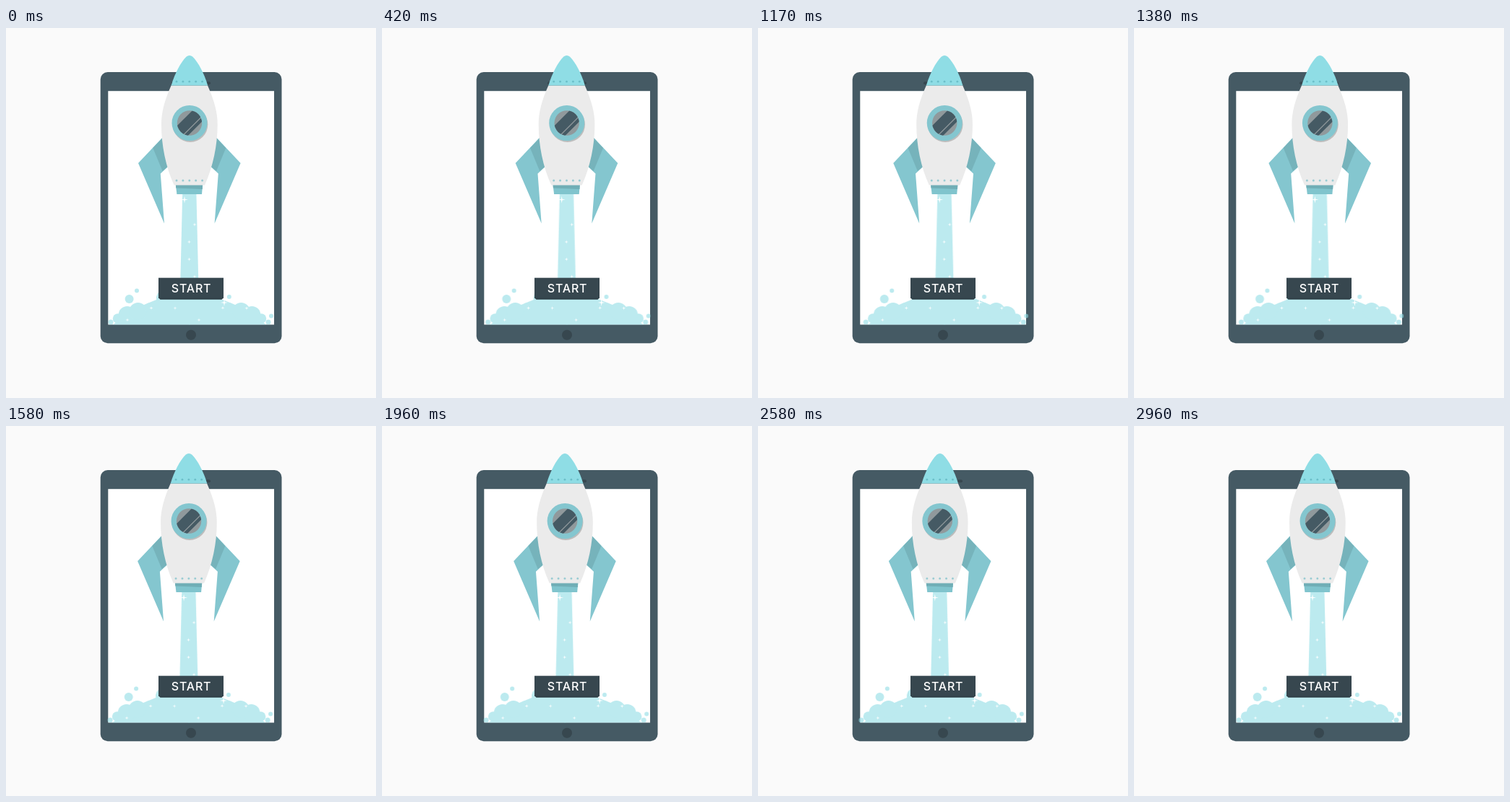
An HTML page that plays this animation: 512x512 px, repeating every 3 s.

```html
<!DOCTYPE html>
<html lang="en">
<head>
<meta charset="utf-8">
<title>Rocket launch</title>
<style>
  html, body { margin: 0; width: 100%; height: 100%; overflow: hidden; background: #fafafa; }
  svg { display: block; width: 100vw; height: 100vh; }
  .label { font: 500 16px Inter, "Open Sans", sans-serif; letter-spacing: .8px; fill: #fff; }
</style>
</head>
<body>
<svg viewBox="0 0 512 512">
  <defs>
    <clipPath id="glass"><circle cx="254" cy="131.5" r="17.2"/></clipPath>
    <clipPath id="floor"><rect width="512" height="410.5"/></clipPath>
  </defs>

  <!-- tablet -->
  <rect x="130.7" y="61" width="250.8" height="375.3" rx="10" fill="#455a64"/>
  <rect x="141.3" y="87.2" width="229.7" height="323.3" fill="#fff"/>
  <rect x="229" y="74.2" width="54" height="4" rx="2" fill="#37474f"/>
  <circle cx="256" cy="424.7" r="7" fill="#37474f"/>

  <g id="ship">
    <!-- exhaust -->
    <g fill="#8fdde5" opacity=".6">
      <path d="M244.2 229H263.4L266.3 350H241.3Z"/>
      <g clip-path="url(#floor)">
        <g id="puffs"><path d="M146 412L168 396L186 385L213 374H255V412Z"/></g>
        <use href="#puffs" transform="translate(508 0) scale(-1 1)"/>
        <circle cx="220" cy="374" r="12"/>
      </g>
      <circle cx="170.6" cy="375" r="6"/>
      <circle cx="181" cy="363.4" r="3"/>
      <circle cx="308.8" cy="372" r="3"/>
      <circle cx="367" cy="398.5" r="3"/>
    </g>
    <g id="sparks" fill="#fff"></g>

    <!-- fins -->
    <g id="fin">
      <path d="M217 151L183 187L219 270.5L213.8 201.5L224 192Z" fill="#84c6cf"/>
      <path d="M217.6 151L203.3 166L216.6 198L226 190Z" fill="#76b3bb"/>
    </g>
    <use href="#fin" transform="translate(507.6 0) scale(-1 1)"/>

    <!-- nozzle -->
    <path d="M234.8 216H272.2L271 230H236.4Z" fill="#80c4cd"/>
    <path d="M234.8 216H272.2L271.8 223L235.2 221.5Z" fill="#70aeb6"/>

    <!-- hull -->
    <path d="M228.6 79.5H279C288 100 293 117 292.7 134C292.7 162 286.5 192 275 217.5H232.6C221 192 215 162 215 134C214.8 117 219.5 100 228.6 79.5Z" fill="#ebebeb"/>
    <path d="M228.6 79.6C234 62 241.5 48 249.5 39.8Q253.9 36 258.3 39.8C266.3 48 273.9 62 279.2 79.6Z" fill="#8fdde5"/>
    <g id="rivets"></g>

    <!-- window -->
    <circle cx="255" cy="133.6" r="24.3" fill="#bdbdbd"/>
    <circle cx="254" cy="131.5" r="24.5" fill="#84c6cf"/>
    <g clip-path="url(#glass)">
      <g transform="translate(254 131.5) rotate(45)">
        <rect x="-20" y="-20" width="40" height="40" fill="#90999c"/>
        <rect x="-9.5" y="-20" width="14.5" height="40" fill="#455a64"/>
        <rect x="6.3" y="-20" width="4.5" height="40" fill="#455a64"/>
      </g>
    </g>
  </g>

  <!-- button -->
  <path d="M211 346H301V373.2L298.5 375.8H213.5L211 373.2Z" fill="#2f3f47"/>
  <rect x="211" y="345.7" width="90" height="28" fill="#37474f"/>
  <text class="label" x="256.6" y="365.6" text-anchor="middle">START</text>
</svg>
<script>
const NS = "http://www.w3.org/2000/svg";
const byId = id => document.getElementById(id);
const add = (parent, tag, attrs) => {
  const el = document.createElementNS(NS, tag);
  for (const key in attrs) el.setAttribute(key, attrs[key]);
  byId(parent).append(el);
};

// Puffs climb from the edge and swell midway
for (let i = 0; i < 5; i++) {
  add("puffs", "circle", {
    cx: 145 + 54 * (i / 4) ** 1.25,
    cy: 407 - 5 * i,
    r: 3.5 + 9.5 * Math.sin(Math.PI * i / 5) ** 2
  });
}

function star(x, y, r) {
  const q = r * .16, p = r - q;
  add("sparks", "path", {
    d: `M${x} ${y - r}l${q} ${p}l${p} ${q}l${-p} ${q}l${-q} ${p}l${-q} ${-p}l${-p} ${-q}l${p} ${-q}Z`
  });
}
star(247, 237.5, 5);
star(302, 380, 5);
for (let i = 0; i < 6; i++) {
  const sway = Math.cos(2.1 * i);
  if (i < 4) star(256 + 5 * sway, 272 + 24 * i, 2.8);
  star(168 + 33 * i, 393 + 11 * sway, 2.8);
}

for (let i = 0; i < 5; i++) {
  const cx = 236 + i * 8.9;
  add("rivets", "circle", {cx, cy: 74.2, r: 1.4, fill: "#6cbfc9"});
  add("rivets", "circle", {cx, cy: 211, r: 1.5, fill: "#9accd3"});
}

// Turning points of the sideways shake: step, offset
const turns = [[0, 0], [13.5, 2], [23, -5], [29, 4.9], [43.5, -3.6], [52, 4], [61.5, -2.2], [67, .2], [72, 0]];
const STEPS = 72, STEP = 3000 / STEPS;

function offset(step) {
  const i = turns.findIndex(([t]) => t > step);
  const [t0, x0] = turns[i - 1], [t1, x1] = turns[i];
  const ease = (1 - Math.cos(Math.PI * (step - t0) / (t1 - t0))) / 2;
  return x0 + (x1 - x0) * ease;
}

const ship = byId("ship");
function draw() {
  const step = Math.floor((performance.now() + 5) / STEP) % STEPS;
  ship.setAttribute("transform", `translate(${offset(step).toFixed(3)} 0)`);
  requestAnimationFrame(draw);
}
draw();
</script>
</body>
</html>
```
